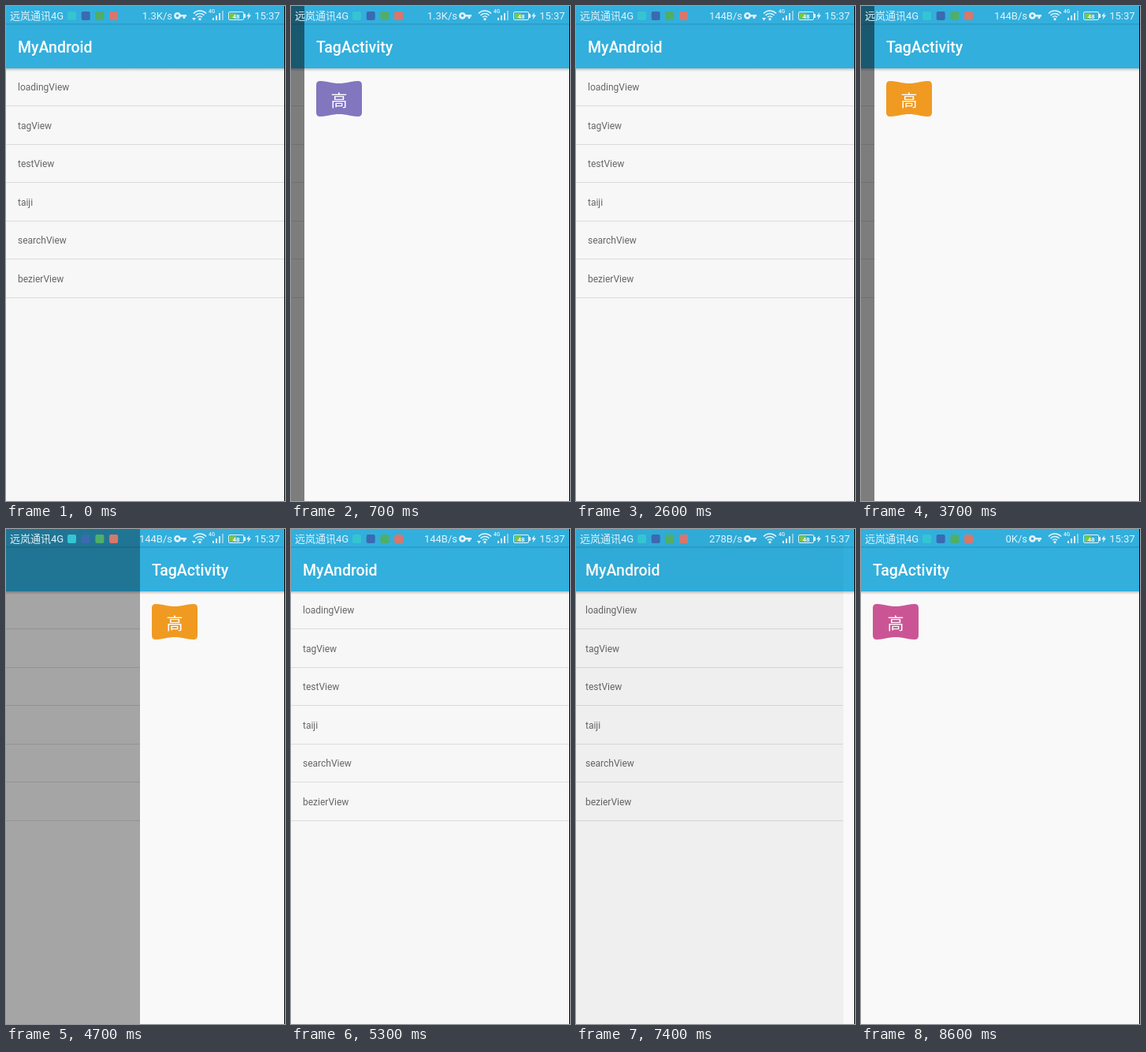
Recreate the animation shown at these times as an HTML page with a canvas. Size 354 px wide and 627 px high, loop 8.8 s.

```html
<!DOCTYPE html>
<html lang="zh">
<head>
<meta charset="utf-8">
<style>
html, body { margin: 0; width: 100%; height: 100%; overflow: hidden; }
canvas { display: block; }
</style>
</head>
<body>
<canvas id="stage" width="354" height="627"></canvas>
<script>
const W = 354, H = 627, LOOP = 8800, STEP = 100;
const BLUE = '#32afdd', PALE = '#e3f3fa';
const SANS = 'Roboto, "Noto Sans CJK SC", "Noto Sans CJK", sans-serif';
const ROWS = ['loadingView', 'tagView', 'testView', 'taiji', 'searchView', 'bezierView'];
const PURPLE = '#8276bf', ORANGE = '#f09a22', PINK = '#cb5594';

// Each visit: when the page slides in, when it is swiped away, tag colour
const VISITS = [
  { open: 350, close: 1900, color: PURPLE },
  { open: 3350, close: 4600, color: ORANGE },
  { open: 5550, close: 7100, color: ORANGE },
  { open: 8050, close: Infinity, color: PINK }
];
const SPEEDS = [[0, '1.3K/s'], [2600, '144B/s'], [5600, '278B/s'], [8600, '0K/s']];
const ARROW = [[0, true], [600, false], [1400, true], [3500, false], [4100, true], [6900, false]];

const c = document.getElementById('stage').getContext('2d');

const latest = (list, t) => list.filter(e => e[0] <= t).pop()[1];

function decelerate(u) {
  u = Math.min(1, Math.max(0, u));
  return 1 - (1 - u) ** 2;
}

function rect(x, y, w, h, color) {
  c.fillStyle = color;
  c.fillRect(x, y, w, h);
}

function text(s, x, y, size, color, weight = 400, align = 'left') {
  c.font = `${weight} ${size}px ${SANS}`;
  c.textAlign = align;
  c.fillStyle = color;
  c.fillText(s, x, y);
}

function box(x, y, w, h, r) {
  c.beginPath();
  c.roundRect(x, y, w, h, r);
}

function page(title, bg) {
  rect(0, 0, W, H, bg);
  rect(0, 0, W, 79, BLUE);
  rect(0, 22, W, 2, '#2c9fca');
  const shade = c.createLinearGradient(0, 79, 0, 83);
  shade.addColorStop(0, 'rgba(0,0,0,.22)');
  shade.addColorStop(1, 'rgba(0,0,0,0)');
  rect(0, 79, W, 4, shade);
  text(title, 15, 59, 19.5, '#fff', 500);
}

function home() {
  page('MyAndroid', '#f7f7f7');
  ROWS.forEach((name, i) => {
    text(name, 15, Math.round(107.3 + i * 48.5), 12, '#666');
    rect(0, Math.floor(126.5 + i * 48.5), W, 1, '#d8dcdf');
  });
}

function tagPage(color) {
  page('TagActivity', '#f9f9f9');
  c.beginPath();
  c.moveTo(15, 100);
  c.quadraticCurveTo(15, 95, 20, 95);
  c.bezierCurveTo(32, 95.5, 34, 98, 44, 98);
  c.bezierCurveTo(54, 98, 56, 95.5, 68, 95);
  c.quadraticCurveTo(73, 95, 73, 100);
  c.lineTo(73, 135);
  c.quadraticCurveTo(73, 140, 68, 140);
  c.bezierCurveTo(56, 139.5, 54, 137, 44, 137);
  c.bezierCurveTo(34, 137, 32, 139.5, 20, 140);
  c.quadraticCurveTo(15, 140, 15, 135);
  c.fillStyle = color;
  c.fill();
  text('高', 44, 127, 21, '#fff', 400, 'center');
}

function wifi(arrow) {
  c.lineWidth = 1.6;
  for (const r of [4, 7.5, 11]) {
    c.beginPath();
    c.arc(246, 17, r, -Math.PI * 0.76, -Math.PI * 0.24);
    c.stroke();
  }
  c.beginPath();
  c.arc(246, 16.7, 1.6, 0, 7);
  c.fill();
  if (arrow) {
    c.beginPath();
    c.moveTo(236, 15);
    c.lineTo(241, 15);
    c.lineTo(238.5, 18.5);
    c.fill();
  }
}

function statusBar(t) {
  text('远岚通讯4G', 5, 17.3, 13, PALE);
  ['#35c5d2', '#3a6ab0', '#4fae68', '#d8776c'].forEach((color, i) => {
    box(78 + i * 17.7, 7, 11, 11, 2);
    c.fillStyle = color;
    c.fill();
  });
  text(latest(SPEEDS, t), 211, 17.3, 13, PALE, 400, 'right');
  text('15:37', 347.5, 17.3, 13, PALE, 400, 'right');

  c.strokeStyle = c.fillStyle = PALE;
  c.lineWidth = 2.6;
  c.beginPath();
  c.arc(217.5, 12.3, 3.1, 0, 7);
  c.moveTo(221, 12.3);
  c.lineTo(229, 12.3);
  c.moveTo(226, 12.3);
  c.lineTo(226, 16);
  c.stroke();

  wifi(latest(ARROW, t));
  text('4G', 257, 9, 6.5, PALE, 500);
  [3, 6, 9, 12].forEach((h, i) =>
    rect(262 + i * 4, 18 - h, 2, h, i < 3 ? PALE : 'rgba(227,243,250,.5)'));

  c.lineWidth = 1;
  box(282.5, 7.5, 19, 10, 1.5);
  c.stroke();
  rect(302, 10, 2, 5, PALE);
  rect(284, 9, 8, 7, '#7cc644');
  text('48', 292, 15.6, 8, '#fff', 500, 'center');
  c.fillStyle = PALE;
  c.beginPath();
  for (const [x, y] of [[309, 8], [305, 13.3], [307.6, 13.3], [306.6, 17.5], [311, 11.6], [308.4, 11.6]]) c.lineTo(x, y);
  c.fill();
}

function draw(t) {
  const visit = VISITS.filter(v => v.open <= t).pop();
  let x = W;
  if (visit) {
    x = t < visit.close
      ? W * (1 - decelerate((t - visit.open) / 450))
      : W * decelerate((t - visit.close + 8.6) / 389);
    x = Math.round(x);
  }
  const covered = W - x;

  // The list trails the page and catches up as more of it is covered
  c.save();
  c.translate(-Math.min(covered, Math.round(covered ** 2 / 75)), 0);
  home();
  c.restore();
  if (covered) {
    rect(0, 0, x, H, `rgba(0,0,0,${0.5 * (1 - (x / W) ** 1.5)})`);
    c.save();
    c.translate(x, 0);
    tagPage(visit.color);
    c.restore();
  }
  statusBar(t);
  rect(W - 1, 0, 1, H, '#000');
}

const start = performance.now();
function tick() {
  const t = (performance.now() - start) % LOOP;
  draw(Math.floor(t / STEP) * STEP);
  requestAnimationFrame(tick);
}
tick();
</script>
</body>
</html>
```
